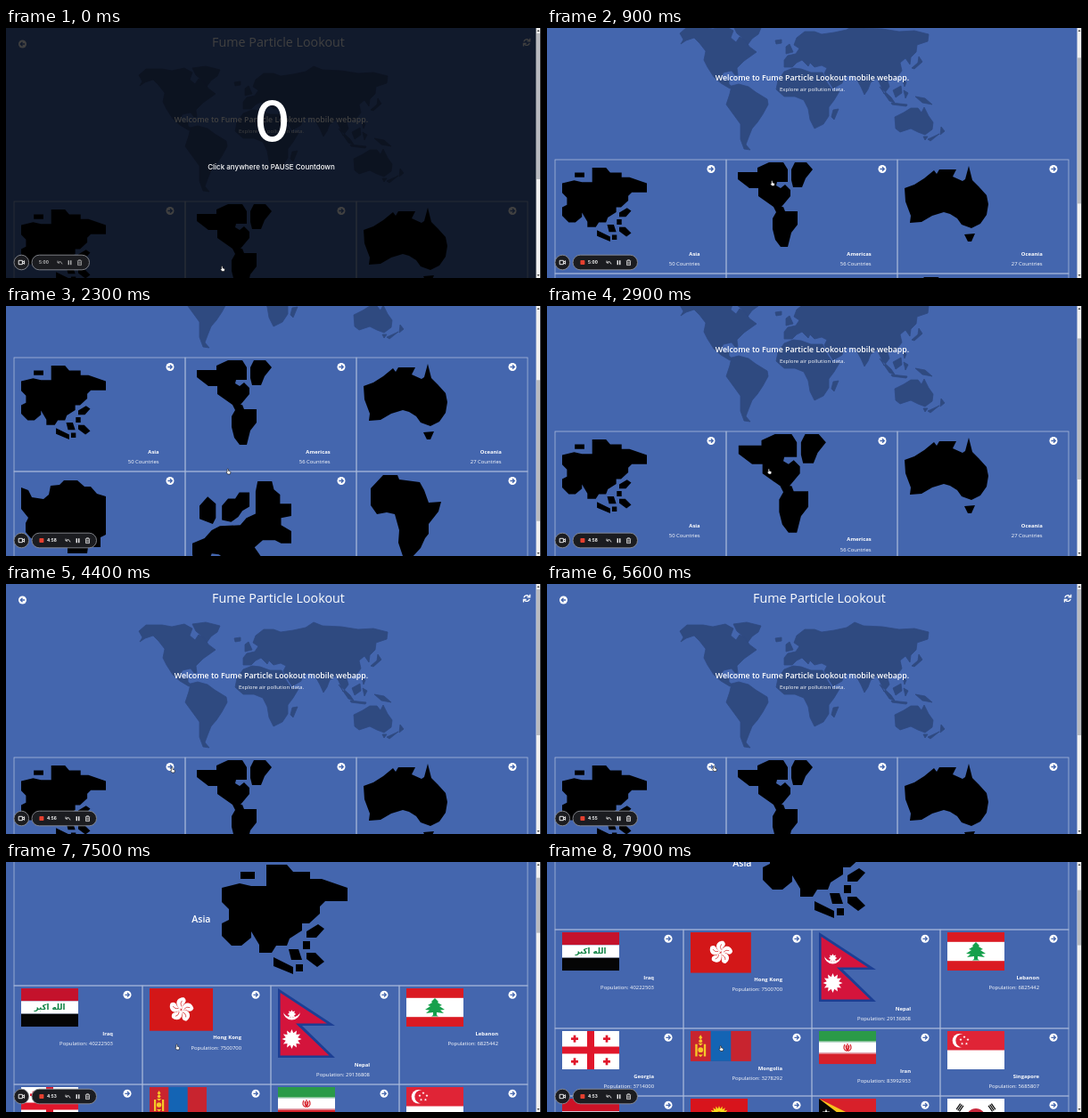
An HTML page for the animation above (8 s loop, 600x281 px).

```html
<!DOCTYPE html>
<html lang="en">
<head>
<meta charset="utf-8">
<title>Fume Particle Lookout</title>
<style>
  html, body { margin: 0; width: 100%; height: 100%; overflow: hidden; background: #4466ae; }
  svg { display: block; width: 600px; height: 281px; }
  text { font-family: "Open Sans", "Noto Sans", sans-serif; fill: #fff; }
  .label { font-size: 5.9px; text-anchor: end; }
  .bold { font-weight: 700; }
  .line { fill: none; stroke: #a9b8da; stroke-width: .8; }
</style>
</head>
<body>
<svg id="stage" viewBox="0 0 600 281"></svg>
<script>
const LOOP = 8000;
const NAME = 'Fume Particle Lookout';
const BLUE = '#4466ae';
const stage = document.getElementById('stage');

function add(parent, tag, attrs = {}, html = '') {
  const node = document.createElementNS('http://www.w3.org/2000/svg', tag);
  set(node, attrs);
  if (html) node.innerHTML = html;
  parent.appendChild(node);
  return node;
}
function set(node, attrs) {
  for (const key in attrs) node.setAttribute(key, attrs[key]);
}
function move(node, x, y, scale = 1) {
  node.setAttribute('transform', `translate(${x} ${y}) scale(${scale})`);
}
function show(node, on) {
  node.setAttribute('visibility', on ? 'visible' : 'hidden');
}
const linear = u => u;
const smooth = u => u * u * (3 - 2 * u);

// Value of a keyed track [[time, value], ...] at time t.
function track(keys, t, ease = linear) {
  if (t <= keys[0][0]) return keys[0][1];
  for (let i = 1; i < keys.length; i++) {
    const [t0, a] = keys[i - 1], [t1, b] = keys[i];
    if (t < t1) return a + (b - a) * ease((t - t0) / (t1 - t0));
  }
  return keys[keys.length - 1][1];
}

// ---------- artwork ----------
const worldMap = [
  'M149 53 157 46 175 46 186 48 200 45 209 50 206 58 212 63 216 57 222 60 227 68 235 74 228 79 221 84 213 92 214 100 211 100 207 95 198 97 195 102 199 107 204 105 204 110 209 114 205 115 195 109 187 102 180 91 176 83 178 73 171 64 165 58 156 61 150 65 153 60Z',
  'M209 45 224 43 240 47 237 54 230 59 225 66 219 58 213 53Z',
  'M207 112 215 110 226 113 234 119 247 127 248 133 242 144 236 153 230 160 226 170 223 178 228 184 221 183 217 172 217 155 209 144 201 133 205 121Z',
  'M266 83 266 91 275 91 280 86 286 83 293 90 295 86 300 91 308 89 314 92 311 98 316 107 321 115 331 109 333 102 341 100 347 104 352 113 356 122 360 116 363 108 370 103 374 111 378 121 384 113 382 106 392 103 398 95 396 86 402 81 407 88 408 80 414 74 415 66 427 62 428 54 412 50 395 51 376 48 355 47 345 43 336 49 322 52 308 54 300 51 289 51 280 58 277 66 283 70 279 76 270 78Z',
  'M266 96 276 92 285 93 296 97 309 97 314 108 320 117 328 118 322 128 316 136 316 146 310 155 300 160 295 150 293 138 288 128 278 124 266 124 257 116 259 106Z',
  'M390 147 400 142 408 137 416 137 420 142 423 136 428 146 433 153 432 161 424 167 416 164 408 160 396 164 391 160Z',
  'M268 68 272 65 276 74 268 76ZM256 61 263 60 263 64 257 65ZM327 138 322 150 319 147 321 139ZM417 79 421 85 412 93 409 92 416 86Z',
  'M373 113 386 125 390 131 384 129ZM388 117 397 112 398 120 391 125ZM386 131 404 133 403 135 387 133ZM400 117 405 120 402 126ZM399 105 403 108 401 113ZM413 124 424 126 432 133 421 131Z',
  'M422 169 427 169 424 173ZM442 158 446 163 441 167ZM440 166 430 174 427 172Z'
].join('');

// Silhouettes: path, top-left corner and side of the square they are drawn in.
const shapes = {
  Asia: [242, 47, 141, 'M263 64H279V72H263ZM292 56H315L322 64H341V72H354L383 82V97H358L352 103V111L340 122H332V130L318 139 315 147H303L298 155H284V146L275 131V138L264 147H253L242 136V122L250 118V106L242 98V82L262 77 275 80H292ZM337 131 350 123 357 128 348 138H337ZM333 142H341V151H333ZM317 151H328L332 163H320ZM337 155H347L357 165 349 171 337 162ZM300 160 322 171V179L300 170ZM325 168H333V176H325Z'],
  Americas: [209, 152, 95, 'M214 163H236V158L249 152H265L270 160V174H258L257 178 262 181 267 177 273 183V190L263 202H265L267 207H281V222L274 231 270 247H262L256 239 253 227V215L257 208 254 202 237 190V181H227L214 171ZM278 152H291L298 160 290 170 286 180H276L274 172V160Z'],
  Oceania: [401, 152, 95, 'M401 181 412 177 423 170 434 161 437 165 440 160H459L455 168 466 173 469 171 473 156 477 172 484 179 493 189 495 199 493 211 486 221 476 226 465 222 460 215 452 210 445 208 432 212 420 219 407 220 408 212 402 196ZM468 233 480 232 476 241H472Z'],
  Antarctic: [17, 145, 95, 'M17 160 25 163 29 171 42 173 48 168 50 158 60 157 65 152H80L88 159H95L102 167 112 170V213L106 216V227H92L91 234H69V226L58 223H42L28 217 22 210V200L25 194 17 184Z'],
  Europe: [209, 145, 97, 'M216 176 224 167 232 174V188L229 194 216 189ZM238 190V176L244 169H251L255 163H265V177L258 181 254 187 247 192ZM271 184V162L273 152H287L289 160 295 165V174H306V186L296 188V195L306 201V213H296L290 210H278L270 217 277 227 273 236H262L253 229H242L235 224 228 223 223 236H212L209 224V213L221 208 228 200 236 196 256 195 262 188Z'],
  Africa: [401, 145, 95, 'M409 161 423 146H439L441 151 464 154 469 163 474 177 488 176 485 187 474 201V212L470 217 465 228 454 240H446L440 222 441 208 436 190 427 188 416 190 409 180Z']
};
function silhouette(name, side) {
  const [x, y, size, d] = shapes[name];
  return `<path d="${d}" transform="scale(${side / size}) translate(${-x} ${-y})"/>`;
}

const rect = (x, y, w, h, fill) => `<rect x="${x}" y="${y}" width="${w}" height="${h}" fill="${fill}"/>`;
const disc = (x, y, r, fill) => `<circle cx="${x}" cy="${y}" r="${r}" fill="${fill}"/>`;
const bands = (h, ...fills) => fills.map((f, i) => rect(0, i * h / fills.length, 64, h / fills.length + .05, f)).join('');
function star(x, y, n, outer, inner, fill) {
  let points = '';
  for (let i = 0; i < 2 * n; i++) {
    const r = i % 2 ? inner : outer, a = Math.PI * (i / n - .5);
    points += `${(x + r * Math.cos(a)).toFixed(2)},${(y + r * Math.sin(a)).toFixed(2)} `;
  }
  return `<polygon points="${points}" fill="${fill}"/>`;
}
const ring = (n, make) => Array.from({ length: n }, (_, i) => make(i)).join('');

function cross(x, y, r) {
  return rect(x - r, y - r / 3, 2 * r, r / 1.5, '#e0162b') + rect(x - r / 3, y - r, r / 1.5, 2 * r, '#e0162b');
}
function trigram(x, y, angle) {
  return `<g transform="translate(${x} ${y}) rotate(${angle})">` +
    [-2.6, -.6, 1.4].map(dy => rect(-4, dy, 8, 1.3, '#111')).join('') + '</g>';
}
const flags = {
  iraq: bands(43, '#c4122c', '#fff', '#050505') +
    '<text x="32" y="24.3" text-anchor="middle" style="font:700 8.6px \'DejaVu Sans\',sans-serif;fill:#0a8040">الله اكبر</text>',
  hongKong: rect(0, 0, 64, 43, '#d31718') + ring(5, i =>
    `<g transform="translate(32 21.5) rotate(${i * 72 + 8})"><path d="M0-.5C-8-3-7-12 1-12.5 5-10 3-7 1.5-5.5 1-4 1-2 0-.5Z" fill="#fff"/><path d="M0-3Q-2.5-6-.5-9" fill="none" stroke="#d31718" stroke-width=".6"/></g>`),
  nepal: '<path d="M0 0 64 42H27L64 78H0Z" fill="#1c3f94"/><path d="M2.6 5 55 39.4H20L57.5 75.4H2.6Z" fill="#d4143c"/>' +
    '<path d="M6 26A9.5 9.5 0 0 0 25 26 9.5 6.5 0 0 1 6 26Z" fill="#fff"/>' +
    star(15.5, 29, 8, 4.8, 3, '#fff') + star(15.5, 57, 12, 11, 7, '#fff'),
  lebanon: rect(0, 0, 64, 43, '#fff') + rect(0, 0, 64, 10.8, '#da1a22') + rect(0, 32.2, 64, 10.8, '#da1a22') +
    '<path d="M32 11 36 15 35 16 40 19 37 20 43 24 38 24.5 42 28 34 27V30L36 31.5H28L30 30V27L22 28 26 24.5 21 24 27 20 24 19 29 16 28 15Z" fill="#16a04c"/>',
  georgia: rect(0, 0, 64, 43, '#fff') + rect(28, 0, 8, 43, '#e0162b') + rect(0, 17.5, 64, 8, '#e0162b') +
    ring(4, i => cross(i % 2 ? 50 : 14, i < 2 ? 8.7 : 34.3, 4)),
  mongolia: rect(0, 0, 64, 32, '#c8242f') + rect(21.3, 0, 21.4, 32, '#1464b4') +
    ['M10.6 4 12.5 7 10.6 9 8.7 7Z', 'M5 14H7.2V27H5ZM14 14H16.2V27H14ZM8 13H13.2L10.6 15.5ZM8 25H13.2L10.6 27.5Z']
      .map(d => `<path d="${d}" fill="#f6c927"/>`).join('') +
    disc(10.6, 10.5, 1.8, '#f6c927') + disc(10.6, 20, 2.7, '#f6c927'),
  iran: bands(37, '#2a9a48', '#fff', '#d6202a') + rect(0, 11.4, 64, 1.1, '#b9dcc2') + rect(0, 24.5, 64, 1.1, '#efb4b8') +
    '<g fill="none" stroke="#d6202a" stroke-width="1.2"><path d="M32 14V23M29 15Q26 20 31 22.5M35 15Q38 20 33 22.5M30.5 16Q29.5 19 32 22M33.5 16Q34.5 19 32 22"/></g>',
  singapore: rect(0, 0, 64, 43, '#fff') + rect(0, 0, 64, 21.5, '#e02436') +
    disc(13.5, 10.8, 7.8, '#fff') + disc(16.7, 10.8, 7.4, '#e02436') +
    ring(5, i => star(19 + 4.2 * Math.sin(i * 1.2566), 10.8 - 4.2 * Math.cos(i * 1.2566), 5, 1.7, .7, '#fff')),
  tricolor: bands(43, '#cc1226', '#fff', '#050505'),
  kyrgyz: rect(0, 0, 64, 43, '#d8141c') + star(32, 19.5, 20, 11.5, 8, '#f8dc1c') + disc(32, 19.5, 5, '#d8141c'),
  timor: rect(0, 0, 64, 32, '#d8202a') + '<path d="M0 0 32 16 0 32Z" fill="#f6c51c"/><path d="M0 0 21 16 0 32Z" fill="#050505"/>' +
    star(8, 16, 5, 4.5, 1.8, '#fff'),
  korea: rect(0, 0, 64, 43, '#fff') + disc(32, 21.5, 10.6, '#c8283c') +
    '<path d="M21.4 21.5A10.6 10.6 0 0 0 42.6 21.5 5.3 5.3 0 0 0 32 21.5 5.3 5.3 0 0 1 21.4 21.5Z" fill="#0c479c"/>' +
    trigram(14, 10, -56) + trigram(50, 10, 56) + trigram(14, 33, 56) + trigram(50, 33, -56)
};

// ---------- shared parts ----------
function arrowIcon(parent, x, y, flip = 1) {
  add(parent, 'g', { transform: `translate(${x} ${y}) scale(${flip} 1)` },
    disc(0, 0, 4.5, '#fff') + `<path d="M-2.6 0H2M0-2.3 2.3 0 0 2.3" fill="none" stroke="${BLUE}" stroke-width="1.3"/>`);
}
function text(parent, x, y, size, weight, content) {
  return add(parent, 'text', { x, y, 'font-size': size, 'font-weight': weight, 'text-anchor': 'middle' }, content);
}
function header(parent) {
  arrowIcon(parent, 18.5, 18, -1);
  text(parent, 305.5, 21.4, 14.3, 500, NAME);
  add(parent, 'path', { d: 'M580.8 15.3A3.3 3.3 0 0 1 586.6 14M587.2 16.9A3.3 3.3 0 0 1 581.4 18.2M587.6 11.8V14.9H584.5M580.4 20.4V17.3H583.5',
    fill: 'none', stroke: '#fff', 'stroke-width': 1.3 });
}

// Grid of cards; item = [title, note, image markup, image height].
// Returns layout(scales) that places every card for the given image scales.
function grid(parent, top, cols, inset, iconY, rows) {
  const w = 576 / cols;
  const cells = rows.map(row => row.map(([title, note, art, h], i) => {
    const g = add(parent, 'g');
    const box = add(g, 'rect', { class: 'line', width: w });
    const image = add(g, 'g', {}, art);
    const words = add(g, 'g');
    add(words, 'text', { class: 'label bold', x: w - inset, y: 12.6 }, title);
    add(words, 'text', { class: 'label', x: w - inset, y: 23.8 }, note);
    arrowIcon(g, w - 17, iconY);
    return { g, box, image, words, title, h, x: 9 + i * w };
  }));
  return scales => {
    let y = top;
    for (const row of cells) {
      const size = c => c.h * (scales[c.title] || 1);
      const high = Math.max(...row.map(size)) + 33;
      for (const c of row) {
        move(c.g, c.x, y);
        c.box.setAttribute('height', high);
        move(c.image, 8, 3, scales[c.title] || 1);
        move(c.words, 0, size(c));
      }
      y += high;
    }
    return y;
  };
}

// ---------- pages ----------
add(stage, 'rect', { width: 600, height: 281, fill: BLUE });

const home = add(stage, 'g');
add(home, 'path', { d: worldMap, fill: '#2f4a80', stroke: '#2f4a80', 'stroke-width': .8, 'stroke-linejoin': 'round' });
header(home);
text(home, 297.5, 106, 8.8, 600, `Welcome to ${NAME} mobile webapp.`);
text(home, 297.5, 118, 6.1, 400, 'Explore air pollution data.');
const land = (name, n) => [name, `${n} Countries`, silhouette(name, 95), 95];
const layHome = grid(home, 195, 3, 29.3, 10.5, [
  [land('Asia', 50), land('Americas', 56), land('Oceania', 27)],
  [land('Antarctic', 5), land('Europe', 53), land('Africa', 59)]
]);

const asia = add(stage, 'g');
header(asia);
add(asia, 'rect', { class: 'line', x: 9, y: 43.5, width: 576, height: 148.5 });
add(asia, 'g', { transform: 'translate(242 47)' }, silhouette('Asia', 141));
add(asia, 'text', { x: 229.5, y: 120.6, 'font-size': 10.6, 'font-weight': 600, 'text-anchor': 'end' }, 'Asia');
const land2 = (name, people, flag, h) => [name, people ? `Population: ${people}` : '', flags[flag], h];
const layAsia = grid(asia, 192, 4, 33, 10.3, [
  [land2('Iraq', 40222503, 'iraq', 43), land2('Hong Kong', 7500700, 'hongKong', 43),
   land2('Nepal', 29136808, 'nepal', 78), land2('Lebanon', 6825442, 'lebanon', 43)],
  [land2('Georgia', 3714000, 'georgia', 43), land2('Mongolia', 3278292, 'mongolia', 32),
   land2('Iran', 83992953, 'iran', 37), land2('Singapore', 5685807, 'singapore', 43)],
  [land2('', 0, 'tricolor', 43), land2('', 0, 'kyrgyz', 39), land2('', 0, 'timor', 32), land2('', 0, 'korea', 43)]
]);

// ---------- countdown, scrollbar, recorder, pointer ----------
const veil = add(stage, 'g', {}, '<rect width="600" height="281" opacity=".75"/>');
text(veil, 298.5, 126.5, 62, 500, '0').style.fontFamily = 'Inter, sans-serif';
text(veil, 297.5, 159.3, 8, 500, 'Click anywhere to PAUSE Countdown').style.fontFamily = 'Inter, sans-serif';

add(stage, 'g', {}, rect(594.5, 0, 5, 281, '#f1f1f1') + rect(599.2, 0, .8, 281, '#111') +
  '<path d="M597 1.8 598.5 4H595.5ZM597 279.2 598.5 277H595.5Z" fill="#505050"/>');
const thumb = add(stage, 'rect', { x: 595, width: 4, fill: '#b9bbc0' });

const bar = add(stage, 'g');
const skin = { fill: '#1b1c20', stroke: '#8a8c92', 'stroke-width': .9 };
add(bar, 'circle', { cx: 17.3, cy: 263.5, r: 8.3, ...skin });
add(bar, 'path', { d: 'M14.2 261.3H18.4V265.7H14.2ZM18.4 263.2 20.6 261.7V265.3L18.4 263.8', fill: 'none', stroke: '#fff', 'stroke-width': .9 });
const pill = add(bar, 'rect', { x: 29, y: 255.2, height: 16.6, rx: 8.3, ...skin });
const stop = add(bar, 'rect', { x: 37.4, y: 261, width: 5, height: 5, rx: .8, fill: '#e5402f' });
const tools = add(bar, 'g', {}, '<path d="M58 261.6V264H60.4M58.2 263.8Q61.5 260.8 63 265.4" fill="none" stroke="#ddd" stroke-width=".9"/>' +
  rect(69.6, 261.2, 1.3, 5, '#fff') + rect(72.1, 261.2, 1.3, 5, '#fff') +
  '<path d="M79.8 261.8H85.2M81.5 261.6V260.7H83.5V261.6M80.5 262.2V266.6H84.5V262.2M81.9 263V265.6M83.1 263V265.6" fill="none" stroke="#ddd" stroke-width=".8"/>');
const clock = add(tools, 'text', { x: 37, y: 265.4, 'font-size': 4.7, 'font-weight': 700 }, '5:00');
clock.style.fontFamily = 'Inter, sans-serif';

const pointer = add(stage, 'path', { d: 'M-1.4-2.6Q-.7-3.5 0-2.6V-.7L2 0Q2.5.4 2.3 1.3L1.8 3H-.8L-2.4.9Q-2.3.1-1.4.5Z',
  fill: '#fff', stroke: '#111', 'stroke-width': .6 });

// ---------- motion ----------
const homeScroll = [[600, 0], [900, 47], [1300, 187], [1400, 187], [1600, 196], [1900, 194], [2300, 137], [2800, 66], [3200, 18], [3500, 0]];
const asiaScroll = [[7100, 0], [7300, 18], [7700, 88], [7900, 116]];
const grow = {
  Americas: [[900, 1], [1150, 1.167], [1290, 1.167], [1400, 1.065], [1520, 1], [2300, 1], [2600, 1.167], [3300, 1.167], [3600, 1]],
  Europe: [[1330, 1], [1400, 1.021], [1700, 1.168], [2300, 1.168], [2600, 1]],
  'Hong Kong': [[6300, 1], [6700, 1.11], [7700, 1.11], [7900, 1.06], [8100, 1]],
  Mongolia: [[7700, 1], [7900, 1.06], [8100, 1.11]]
};
const pointerX = [[100, 243], [600, 253], [900, 253], [1400, 248.5], [2300, 249.5], [3600, 249.5], [4200, 187], [5500, 187], [5600, 188], [6100, 189], [7100, 189], [7900, 195.5]];
const pointerY = [[100, 270.5], [600, 174.5], [900, 174.5], [1400, 184], [2300, 186], [3600, 186], [4200, 209], [5500, 209], [5600, 207.5], [6100, 206.5], [7100, 206.5], [7900, 209.5]];
const ticks = [1100, 2150, 3200, 4200, 5200, 6100, 7000];

function draw(t) {
  const counting = t < 100, onAsia = t >= 6300;
  const scroll = track(onAsia ? asiaScroll : homeScroll, t);
  const scales = {};
  for (const name in grow) scales[name] = track(grow[name], t, smooth);

  show(home, !onAsia);
  show(asia, onAsia);
  show(veil, counting);
  const bottom = onAsia ? (layAsia(scales), 1220) : layHome(scales) + 10;
  move(onAsia ? asia : home, 0, -scroll);
  set(thumb, { y: 6 + 269 * scroll / bottom, height: 269 * 281 / bottom });

  pill.setAttribute('width', counting ? 64.5 : 72.5);
  show(stop, !counting);
  tools.setAttribute('opacity', counting ? .7 : 1);
  move(tools, counting ? 0 : 9, 0);
  const left = 300 - ticks.filter(at => t >= at).length;
  clock.textContent = `${Math.floor(left / 60)}:${String(left % 60).padStart(2, '0')}`;

  move(pointer, track(pointerX, t, smooth), track(pointerY, t, smooth));
}

const start = performance.now();
function frame() {
  const t = (performance.now() - start) % LOOP;
  draw(Math.floor(t / 100) * 100);
  requestAnimationFrame(frame);
}
frame();
</script>
</body>
</html>
```
